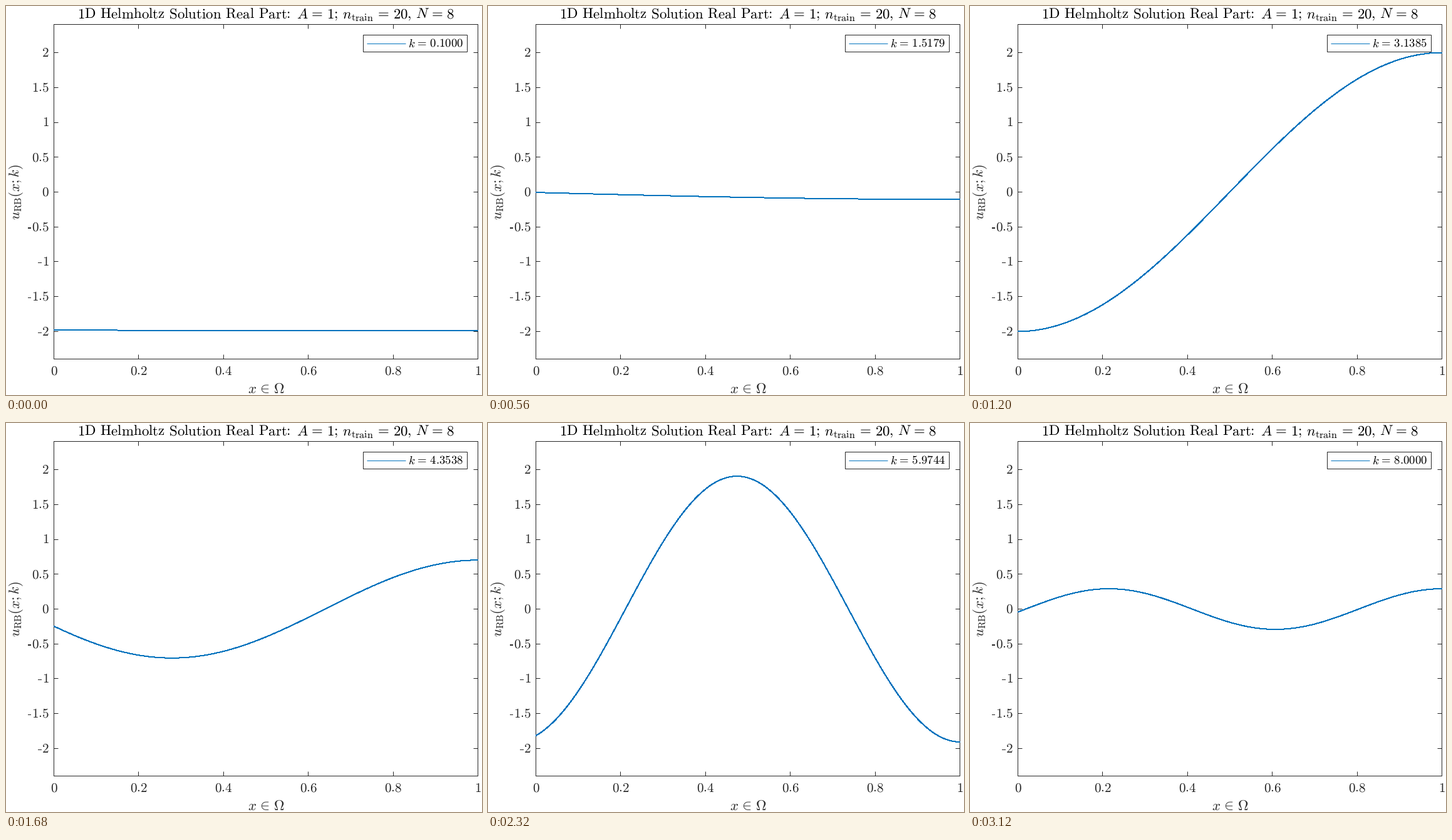
Recreate the animation shown at these times as a matplotlib script. Size 760 by 622 pixels, loop 3.2 s.

```python
import numpy as np
import matplotlib.pyplot as plt
from matplotlib.animation import FuncAnimation
from matplotlib.patches import Rectangle

W, H, DPI = 760, 622, 80
FRAMES, STEP = 40, 80
PT = 72 / DPI
INK, BLUE = "#262626", "#0072BD"
LEFT, RIGHT, TOP, BOTTOM = 76, 753, 29, 564
TICK_SIZE, LABEL_SIZE, LEGEND_SIZE = 21.2, 22.9, 18.75

plt.rcParams.update({"mathtext.fontset": "cm", "text.hinting": "none",
                     "path.simplify": False})

fig = plt.figure(figsize=(W / DPI, H / DPI), dpi=DPI, facecolor="white")
ax = fig.add_axes([0, 0, 1, 1])
ax.set(xlim=(0, W), ylim=(H, 0))
ax.axis("off")


def px(x):
    return LEFT + 0.5 + (RIGHT - LEFT) * x


def py(u):
    return (TOP + BOTTOM) / 2 + 1 - u * (BOTTOM - TOP) / 4.8


def em(width):
    """Horizontal math space, given in ems."""
    return rf"\hspace{{{width / 0.878:.3f}}}"


def rel(symbol):
    """Relation sign with TeX's wide spacing."""
    return em(0.102) + symbol + em(0.102)


def label(x, y, tex, size, color=INK, ha="center", **kw):
    return ax.text(x, y, f"${tex}$", fontsize=size * PT, color=color,
                   ha=ha, va="baseline", **kw)


def stroke(xs, ys, color=INK, **kw):
    return ax.plot(xs, ys, color=color, lw=PT, solid_capstyle="butt", **kw)[0]


def box(x0, y0, x1, y1, face="none", z=1):
    ax.add_patch(Rectangle((x0, y0), x1 - x0, y1 - y0, fc=face, ec=INK,
                           lw=PT, zorder=z, joinstyle="miter"))


def x_tick(v):
    x = int(px(v))
    for y, d in ((BOTTOM, -7), (TOP, 7)):
        stroke([x, x], [y, y + d], zorder=1)
    label(px(v), 590, rf"\mathrm{{{v:g}}}", TICK_SIZE)


def y_tick(v):
    y, right = int(py(v)), 68.8
    for x, d in ((LEFT, 7), (RIGHT, -7)):
        stroke([x, x + d], [y, y], zorder=1)
    base = py(v) + 6.3
    text = f"{abs(v):g}"
    label(right, base, rf"\mathrm{{{text}}}", TICK_SIZE, ha="right")
    if v < 0:
        width = 1.278 if "." in text else 0.5
        x = right - (width + 0.322) * TICK_SIZE
        ax.add_patch(Rectangle((x, base - 0.245 * TICK_SIZE),
                               0.265 * TICK_SIZE, 0.06 * TICK_SIZE,
                               fc=INK, ec="none"))


# Axes
box(LEFT, TOP, RIGHT, BOTTOM)
for i in range(6):
    x_tick(i / 5)
for i in range(-4, 5):
    y_tick(i / 2)

# Title and axis labels
words = em(0.333).join("1D Helmholtz Solution Real Part".split())
title = (rf"\mathrm{{{words}}}" + em(-0.176) + ":" + em(0.268)
         + "A" + rel("=") + "1;" + em(0.157)
         + r"n_{\mathrm{train}}" + em(0.04) + rel("=") + "20," + em(0.157)
         + "N" + rel("=") + "8")
label(414.8, 20, title, LABEL_SIZE, "black")
label(415, 619, "x" + rel(r"\in") + r"\Omega", LABEL_SIZE)
label(21, 297.5, r"u_{\mathrm{RB}}" + em(-0.06) + "(x;k)", LABEL_SIZE,
      rotation=90, rotation_mode="anchor")

# Legend
box(570, 46, 736, 73, face="white", z=4)
stroke([576, 638], [60, 60], BLUE, zorder=5)
k_text = label(642.5, 66, "k", LEGEND_SIZE, "black", ha="left", zorder=5)

# Solution curve, drawn crisp without antialiasing
xs = np.linspace(0, 1, 401)
curve = stroke(px(xs), py(0 * xs), BLUE, zorder=3, antialiased=False,
               snap=False)


def update(i):
    k = 0.1 + 7.9 * i / (FRAMES - 1)
    curve.set_ydata(py(-2 * np.cos(k) * np.cos(k * (1 - xs))))
    k_text.set_text("$k" + rel("=") + f"{k:.4f}$")
    return curve, k_text


anim = FuncAnimation(fig, update, frames=FRAMES, interval=STEP,
                     repeat=True, repeat_delay=0, blit=False)
plt.show()
```
